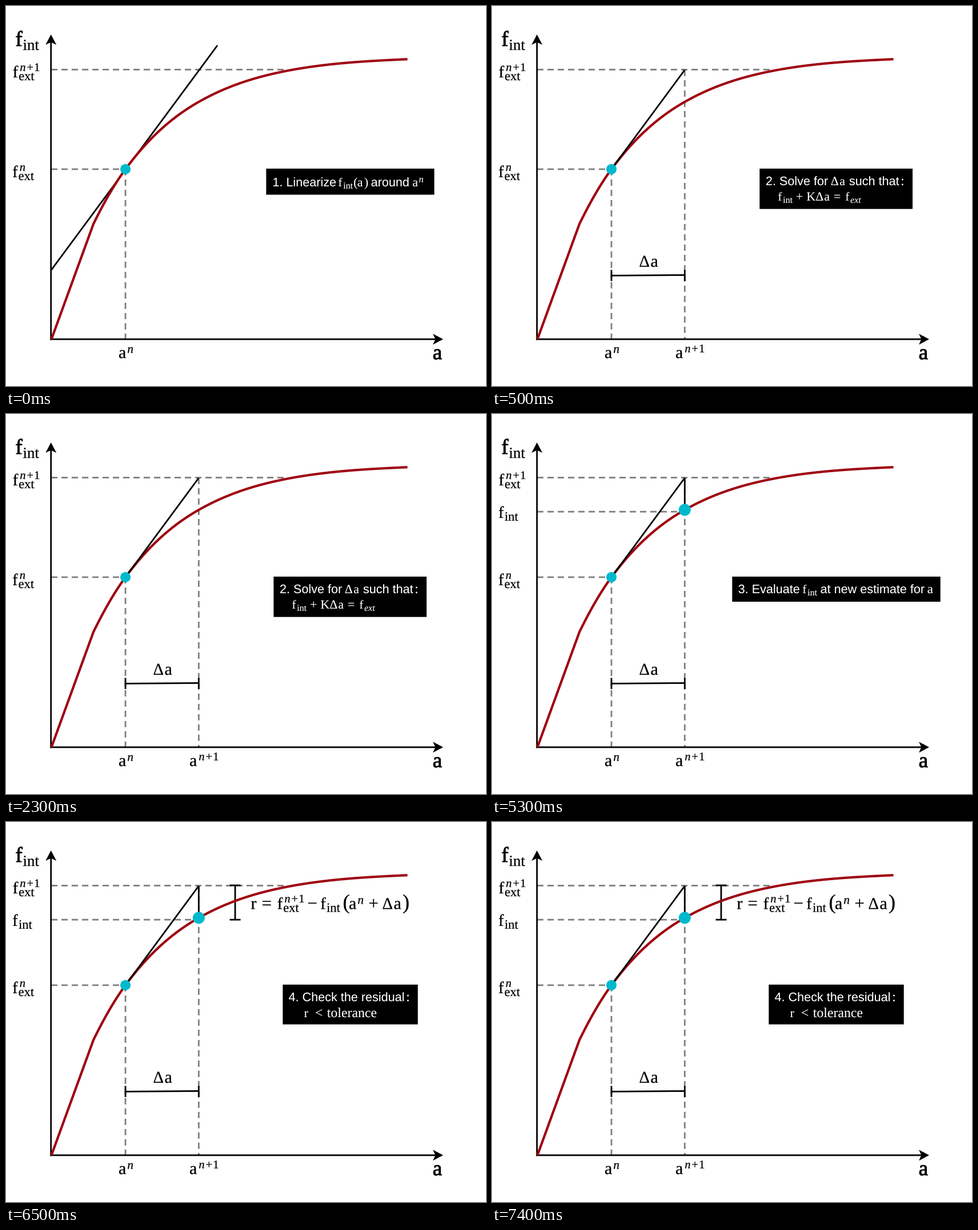
A matplotlib script that plays this animation: 840 by 666 pixels, repeating every 8 s.

```python
import numpy as np
import matplotlib.pyplot as plt
from matplotlib.animation import FuncAnimation
from matplotlib.patches import Circle, PathPatch, Polygon, Rectangle
from matplotlib.path import Path
from matplotlib.textpath import TextPath

W, H, DPI = 840, 666, 100
PX = 72 / DPI  # points per pixel
STEP = 500  # ms per frame
STARTS = [0, 500, 3500, 6500]  # when each step begins
LOOP = 8000

RED, CYAN, GREY = "#9f0010", "#00b9cc", "#7f7f7f"
ALL, FROM_2, FROM_3 = (0, 1, 2, 3), (1, 2, 3), (2, 3)

fig = plt.figure(figsize=(W / DPI, H / DPI), dpi=DPI, facecolor="white")
ax = fig.add_axes([0, 0, 1, 1])
ax.set_xlim(0, W)
ax.set_ylim(H, 0)
ax.axis("off")

parts = []  # (artist, steps in which it shows)


def keep(artist, steps):
    artist.set_snap(False)
    parts.append((artist, steps))


def line(xs, ys, steps=ALL, color="black", width=2.8, z=3, **kw):
    artist, = ax.plot(xs, ys, color=color, lw=width * PX, zorder=z,
                      solid_capstyle="butt", **kw)
    keep(artist, steps)


def dashed(xs, ys, steps=ALL):
    line(xs, ys, steps, GREY, 2.8, 1, linestyle=(0, (11 / 2.8, 7 / 2.8)))


def shape(patch, steps=ALL, z=5):
    patch.set_zorder(z)
    ax.add_patch(patch)
    keep(patch, steps)


def text(s, x, y, size, steps=ALL, color="black", font="Liberation Serif",
         style="normal", weight=0.25):
    """Set s with its ink starting at x on the baseline y."""
    path = TextPath((0, 0), s, size=size, prop={"family": font, "style": style})
    verts = path.vertices * [1, -1]
    verts = verts + [x - path.get_extents().x0, y]
    shape(PathPatch(Path(verts, path.codes), fc=color, ec=color,
                    lw=weight * PX), steps, 8)


def italic(s, x, y, size, steps=ALL, **kw):
    text(s, x, y, size, steps, style="italic", **kw)


def n_plus_1(x, y, steps=ALL):
    italic("n", x, y, 20.5, steps)
    text("+", x + 12.5, y, 20.5, steps)
    text("1", x + 26, y, 20.5, steps)


def f_sub(sub, x, y, steps=ALL):
    text("f", x, y, 29, steps)
    text(sub, x + 10.5, y + 5, 22.5, steps)


def a_n(x, y, steps=ALL):
    text("a", x, y, 30, steps)
    italic("n", x + 15, y - 9, 21.5, steps)


def delta_a(x, y, steps):
    text("Δ", x, y, 29, steps)
    text("a", x + 20, y, 30, steps)


def hermite(points, n=40):
    """Smooth curve through (x, y, slope) points."""
    xs, ys = [], []
    for (x0, y0, m0), (x1, y1, m1) in zip(points, points[1:]):
        t = np.linspace(0, 1, n)
        d = x1 - x0
        xs.append(x0 + d * t)
        ys.append((1 + 2 * t) * (1 - t) ** 2 * y0 + t * (1 - t) ** 2 * d * m0
                  + t ** 2 * (3 - 2 * t) * y1 + t ** 2 * (t - 1) * d * m1)
    return np.concatenate(xs), np.concatenate(ys)


# Axes with arrowheads
line([78.7, 78.7], [585.4, 60])
line([77.5, 755], [584, 584])
head = np.array([(0, 0), (-18, -9.5), (-13.5, 0), (-18, 9.5)])
shape(Polygon(head + [765, 584], fc="black", lw=0))
shape(Polygon(head[:, ::-1] * [1, -1] + [78.7, 50], fc="black", lw=0))

# Guides
dashed([79, 487], [111.5, 111.5])
dashed([79, 209], [286, 286])
dashed([209, 209], [286, 584])
dashed([337.3, 337.3], [112, 584], FROM_2)
dashed([79, 337], [171.2, 171.2], FROM_3)

# Load curve, straight up to the yield point
cx, cy = hermite([(153, 382, -2.05), (209, 286, -1.36), (337, 168.2, -0.57),
                  (487, 114.5, -0.2), (702.5, 93.2, -0.045)])
line(np.r_[79.5, cx], np.r_[584, cy], color=RED, width=4.2, z=4)

# Tangent, then its clipped part and the drop to the curve
line([79, 370], [463, 69], (0,))
line([209, 337.3], [286, 112], FROM_2, z=5)
line([337.3, 337.3], [112, 167], FROM_3, z=5)
shape(Circle((209, 286), 9, fc=CYAN, lw=0), ALL, 7)
shape(Circle((337.3, 168), 10.5, fc=CYAN, lw=0), FROM_3, 7)

# Measuring bars
line([209, 337.3], [472.5, 471.5], FROM_2)
for x in (209, 337.3):
    line([x, x], [462.5, 482], FROM_2)
line([401, 401], [111, 171.2], (3,))
for y in (111, 171.2):
    line([391.5, 410.5], [y, y], (3,))

# Axis labels
text("f", 17.5, 70, 37.5, weight=0.9)
text("int", 30, 77, 27)
text("a", 748, 619, 37, weight=1)
f_sub("ext", 12.5, 125)
n_plus_1(25, 114)
f_sub("int", 12, 182, FROM_3)
f_sub("ext", 12, 300)
italic("n", 24.5, 289, 20.5)
a_n(198, 617)
text("a", 322, 617, 30, FROM_2)
n_plus_1(338, 607, FROM_2)
delta_a(258.5, 457, FROM_2)

# Residual formula
R = (3,)
BASE = 152.5
text("r", 429, BASE, 30, R)
text("=", 449, BASE, 31, R)
f_sub("ext", 475.5, BASE, R)
n_plus_1(488, 141, R)
text("−", 529, BASE, 31, R)
f_sub("int", 551, BASE, R)
text("(", 591, BASE, 37, R)
a_n(601, BASE, R)
text("+", 636, BASE, 31, R)
delta_a(659.5, BASE, R)
text(")", 695, BASE, 37, R)


# Captions
def box(x0, x1, y1, step):
    shape(Rectangle((x0, 285), x1 - x0, y1 - 285, fc="black", lw=0), (step,), 6)


def sans(s, x, y, step):
    text(s, x, y, 21.6, (step,), "white", "Liberation Sans", weight=0.1)


def serif(s, x, y, step, size=22, style="normal"):
    text(s, x, y, size, (step,), "white", style=style, weight=0.1)


def small_f(x, y, step, sub="int", style="normal"):
    serif("f", x, y, step, 21)
    serif(sub, x + 8.5, y + 4, step, 16, style)


box(455.3, 749.5, 330.7, 0)
sans("1. Linearize", 468, 316, 0)
small_f(582, 316, 0)
for s, x in (("(", 609), ("a", 615.5), (")", 627.5), ("a", 712)):
    serif(s, x, 316, 0)
sans("around", 639.5, 316, 0)
serif("n", 723, 309, 0, 16.5, "italic")

box(468.3, 736, 355.7, 1)
sans("2. Solve for", 480, 314, 1)
serif("Δ", 593.5, 314, 1)
serif("a", 609, 314, 1)
sans("such that", 625.5, 314, 1)
serif(":", 717, 314, 1, 24)
small_f(501, 341, 1)
for s, x in (("+", 533), ("K", 551), ("Δ", 567), ("a", 582), ("=", 599)):
    serif(s, x, 341, 1)
small_f(619, 341, 1, "ext", "italic")

box(420.3, 784.7, 329, 2)
sans("3. Evaluate", 431.5, 314, 2)
small_f(544, 314, 2)
sans("at new estimate for", 575.5, 314, 2)
serif("a", 762.5, 314, 2, 23)

box(484.3, 720.7, 354.7, 3)
sans("4. Check the residual", 495, 314, 3)
serif(":", 702, 314, 3, 24)
serif("r", 522, 342, 3)
serif("<", 542, 342, 3, 24)
serif("tolerance", 562, 342, 3, 23.8)


def draw(i):
    step = sum(i * STEP >= t for t in STARTS) - 1
    for artist, steps in parts:
        artist.set_visible(step in steps)
    return [artist for artist, _ in parts]


anim = FuncAnimation(fig, draw, frames=LOOP // STEP, interval=STEP,
                     repeat=True, repeat_delay=0, blit=False)
plt.show()
```
